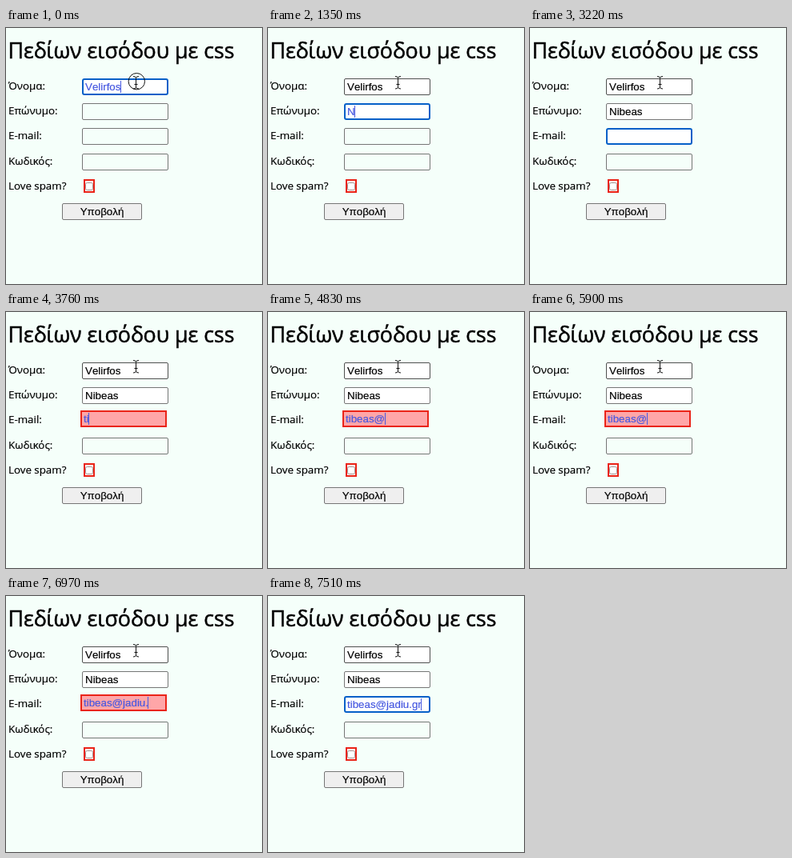
Animation of 320x320 px, one loop 8 s. Source, as an HTML page:

```html
<!DOCTYPE html>
<html lang="el">
<head>
<meta charset="utf-8">
<title>Form</title>
<style>
  html, body { margin: 0; width: 100%; height: 100%; overflow: hidden; background: #f5fffa; }
  svg { display: block; width: 320px; height: 320px; }
  text {
    font: 13.333px "Open Sans", "Noto Sans", sans-serif;
    white-space: pre;
    fill: currentColor;
    stroke: currentColor;
    stroke-width: .2px;
  }
  .title { font-size: 26.8px; stroke-width: .5px; }
  .field text, .button text { font-family: "Liberation Sans", Arial, sans-serif; font-kerning: none; }
  .box { fill: #f5fffa; stroke: #767676; }
  .filled .box { fill: #fff; }
  .hover .box { stroke: #4f4f4f; }
  .focus { color: #4658e0; }
  .focus .box { fill: #fff; stroke: #0560c8; stroke-width: 2; }
  .invalid .box { fill: #ffa6a8; stroke: #ea2418; }
  .caret { fill: currentColor; }
  .pointer { fill: none; stroke: #111; }
</style>
</head>
<body>
<svg id="stage" viewBox="0 0 320 320">
  <text class="title" x="2.5" y="38">Πεδίων εισόδου με css</text>
  <g id="rows"></g>
  <rect x="98" y="190" width="12" height="15" fill="#fff3f0" stroke="#ea2418" stroke-width="2"/>
  <rect x="99.5" y="193.5" width="9" height="9" rx="2" fill="#fff" stroke="#a09494"/>
  <g class="button">
    <rect x="70.5" y="219.5" width="99" height="20" rx="1.5" fill="#efefef" stroke="#767676"/>
    <text x="120" y="234" text-anchor="middle">Υποβολή</text>
  </g>
  <g class="pointer">
    <circle id="ring" cx="163.3" cy="66.7" r="10.2"/>
    <path d="M159 60.5q3.5 0 3.5 2v11.5q0 2-3.5 2M166 60.5q-3.5 0-3.5 2M162.5 74q0 2 3.5 2M160.5 70.5h4"/>
  </g>
</svg>
<script>
const LOOP = 8000;
const LABELS = ["Όνομα:", "Επώνυμο:", "E-mail:", "Κωδικός:", "Love spam?"];
const EMAIL = 2;

// One token per beat: "_" waits, ">" moves to the next field,
// "|" blinks the caret, anything else is typed.
const SCRIPT = "_ > _ | _ N i b ea s _ > | t i be as _ @ _ | _ | ja d iu . g r _".split(" ");

function set(el, attrs) {
  for (const key in attrs) el.setAttribute(key, attrs[key]);
  return el;
}

function add(parent, tag, attrs) {
  const el = document.createElementNS("http://www.w3.org/2000/svg", tag);
  return parent.appendChild(set(el, attrs));
}

const rows = document.getElementById("rows");
const ring = document.getElementById("ring");
const rowTop = i => Math.floor(63.2 + 31.3 * i);

LABELS.forEach((label, i) => {
  add(rows, "text", { x: 3, y: rowTop(i) + 14 }).textContent = label;
});

// Every row but the checkbox has a text field.
const fields = LABELS.slice(0, -1).map((_, i) => {
  const group = add(rows, "g", {});
  return {
    group,
    top: rowTop(i),
    box: add(group, "rect", { class: "box" }),
    text: add(group, "text", { x: 4, y: 15 }),
    caret: add(group, "rect", { class: "caret", y: 3, width: 1, height: 15 })
  };
});

const badEmail = s => s !== "" && !/^\w+@\w+(\.\w+)?$/.test(s);

// Replays the script up to the given beat.
function stateAt(beat) {
  const state = { values: ["Velirfos", "", "", ""], active: 0, caret: true };
  for (const token of SCRIPT.slice(0, beat + 1)) {
    if (token === "_") continue;
    if (token === "|") {
      state.caret = !state.caret;
      continue;
    }
    state.caret = true;
    if (token === ">") state.active++;
    else state.values[state.active] += token;
  }
  return state;
}

function drawField(field, value, flags, caret) {
  const inset = flags.focus ? 1 : 0.5;
  const shift = flags.invalid ? 2 : 0;
  const names = Object.keys(flags).filter(name => flags[name]);
  set(field.group, {
    class: ["field", ...names].join(" "),
    transform: `translate(${95 - shift} ${field.top - shift})`
  });
  set(field.box, {
    x: inset, y: inset, width: 108 - 2 * inset, height: 21 - 2 * inset,
    rx: flags.invalid ? 0 : 1 + inset
  });
  field.text.textContent = value;
  const width = value ? field.text.getComputedTextLength() : 0;
  set(field.caret, {
    x: 4 + Math.floor(width),
    visibility: flags.focus && caret ? "visible" : "hidden"
  });
}

function draw(beat) {
  const { values, active, caret } = stateAt(beat);
  fields.forEach((field, i) => {
    const flags = {
      filled: values[i] !== "",
      hover: i === 0,
      focus: i === active,
      invalid: i === EMAIL && badEmail(values[i])
    };
    drawField(field, values[i], flags, caret);
  });
  set(ring, { visibility: active === 0 ? "visible" : "hidden" });
}

let shown = -1;
const start = performance.now();

function tick() {
  const time = (performance.now() - start) % LOOP;
  const beat = Math.floor(time / LOOP * SCRIPT.length);
  if (beat !== shown) draw(shown = beat);
  requestAnimationFrame(tick);
}
tick();
</script>
</body>
</html>
```
